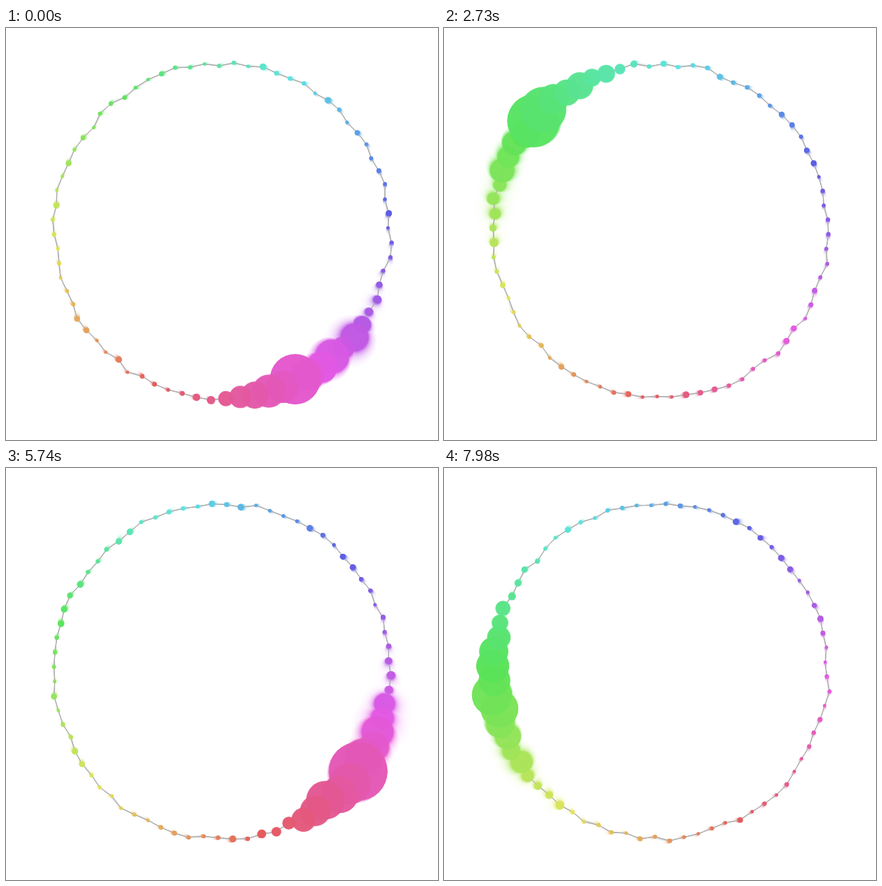
An HTML page with a canvas for the animation above (8 s loop, 618 px wide and 590 px high).

```html
<!DOCTYPE html>
<html lang="en">
<head>
<meta charset="utf-8">
<title>Pulse ring</title>
<style>
  html, body { margin: 0; width: 100%; height: 100%; overflow: hidden; background: #fff; }
  canvas { display: block; width: 618px; height: 590px; }
</style>
</head>
<body>
<canvas id="stage" width="618" height="590"></canvas>
<script>
const W = 618, H = 590, LOOP = 8000, TICK = 70;
const COUNT = 72, STEP = 360 / COUNT;
const CX = 309.5, CY = 291, RADIUS = 240;
const SPIN = -6.52, PULSE_SPEED = 58.8;   // degrees per second
const PULSE_START = 66, PULSE_GAIN = 8.8, MAX_SIZE = 42;
const FRONT = 4.2, BACK = 5.6;            // pulse reach, in dots
const TRAIL = 16, TRAIL_DT = 0.02, FADE = 0.22;
const TAU = Math.PI * 2;
const ctx = document.getElementById('stage').getContext('2d');

let seed = 4217;
function rand() {
  seed = (seed * 16807) % 2147483647;
  return seed / 2147483647;
}

// Smooth wandering value in -1..1
function makeWave(low, high) {
  const f1 = low + rand() * (high - low), f2 = low + rand() * (high - low);
  const p1 = rand() * TAU, p2 = rand() * TAU;
  return t => (Math.sin(TAU * f1 * t + p1) + Math.sin(TAU * f2 * t + p2)) / 2;
}

const dots = Array.from({ length: COUNT }, (_, i) => {
  const angle = 3.8 + i * STEP;
  return {
    angle,
    color: `hsl(${(angle + 246) % 360}, 72%, 62%)`,
    wobble: makeWave(0.25, 0.75),
    grow: makeWave(0.15, 0.5)
  };
});

function dotAt(dot, t) {
  const deg = dot.angle + SPIN * t;
  const pulse = PULSE_START + PULSE_SPEED * t;
  const gap = ((deg - pulse) % 360 + 540) % 360 - 180;
  const d = gap / STEP / (gap > 0 ? FRONT : BACK);
  const u = (dot.grow(t) + 1) / 2;
  const base = 2.3 + 2.6 * u * u;
  const r = RADIUS + 4 * dot.wobble(t);
  const a = deg * Math.PI / 180;
  return {
    x: CX + r * Math.cos(a),
    y: CY + r * Math.sin(a),
    size: Math.min(MAX_SIZE, base * (1 + PULSE_GAIN * Math.exp(-d * d))),
    color: dot.color,
    gap
  };
}

function drawRing(t) {
  const ring = dots.map(dot => dotAt(dot, t));
  ctx.globalAlpha = 1;
  ctx.beginPath();
  for (const p of ring) ctx.lineTo(p.x, p.y);
  ctx.closePath();
  ctx.strokeStyle = '#a8a8a8';
  ctx.lineWidth = 1;
  ctx.stroke();

  // Circles nearer the front of the pulse lie on top
  ctx.globalAlpha = 0.9;
  ring.sort((a, b) => a.gap - b.gap);
  for (const p of ring) {
    ctx.fillStyle = p.color;
    ctx.beginPath();
    ctx.arc(p.x, p.y, p.size, 0, TAU);
    ctx.fill();
  }
}

function veil(alpha) {
  ctx.globalAlpha = alpha;
  ctx.fillStyle = '#fff';
  ctx.fillRect(0, 0, W, H);
}

// Replays the last moments under fading white, so trails depend on time alone
function render(ms) {
  const t = Math.floor(ms / TICK) * TICK / 1000;
  veil(1);
  for (let k = TRAIL; k >= 0; k--) {
    veil(FADE);
    drawRing(t - k * TRAIL_DT);
  }
}

const start = performance.now();
let shown = -1;
function loop() {
  const ms = (performance.now() - start) % LOOP;
  const tick = Math.floor(ms / TICK);
  if (tick !== shown) {
    shown = tick;
    render(ms);
  }
  requestAnimationFrame(loop);
}
loop();
</script>
</body>
</html>
```
